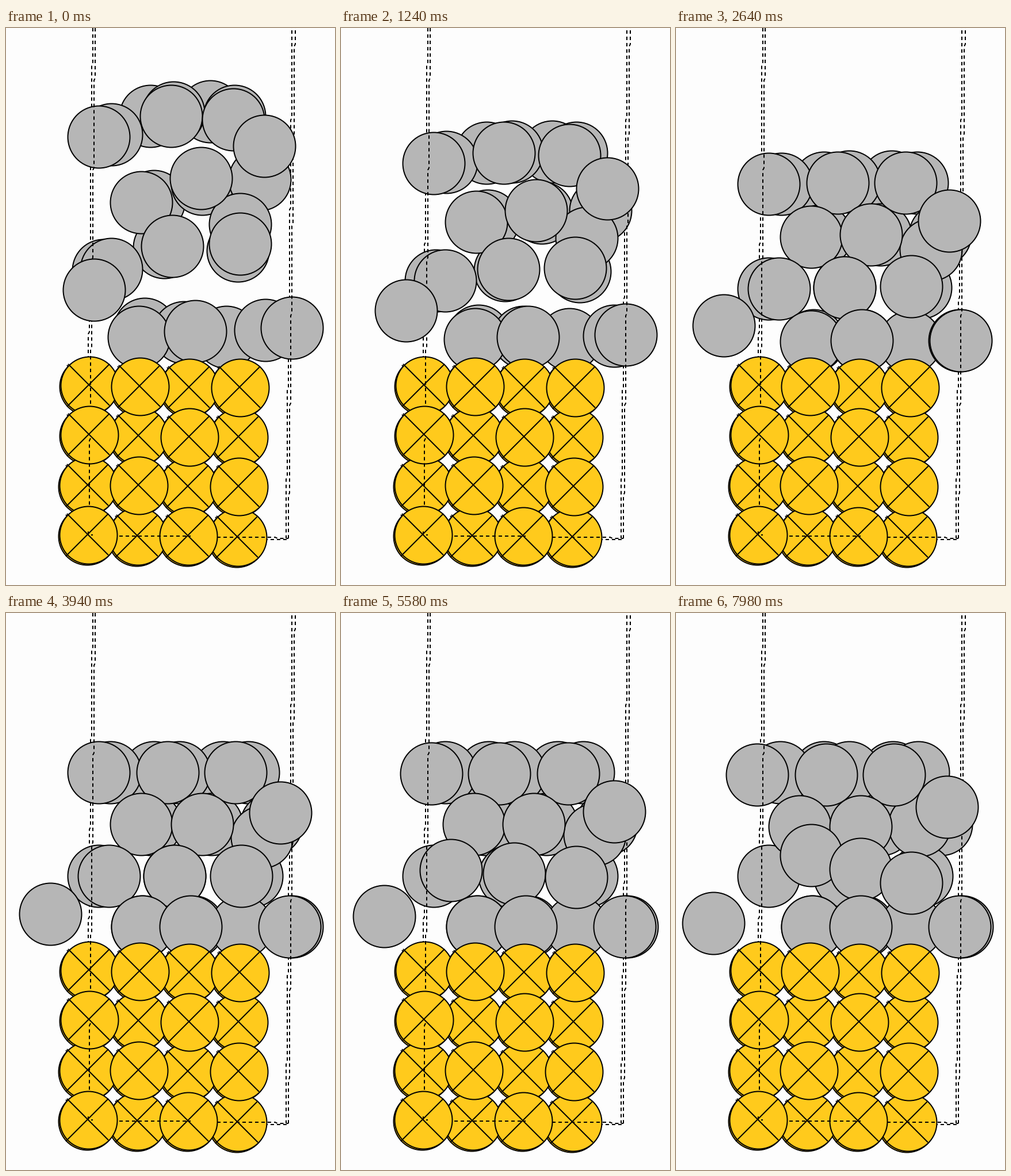
Animation, 572 px wide and 968 px high, one loop 8000 ms. Source, as a matplotlib script:

```python
import numpy as np
import matplotlib.pyplot as plt
from matplotlib.animation import FuncAnimation
from matplotlib.collections import EllipseCollection

W, H, DPI = 572, 968, 100
TICK, LOOP = 20, 8000
PX = 72 / DPI
PAPER, GREY, GOLD = "#fdfdfd", "#b6b6b6", "#ffca1c"
ROWS = [(161, 119), (235, 105), (179, 115), (236, 86)]  # first x, spacing

rng = np.random.default_rng(4)
fig = plt.figure(figsize=(W / DPI, H / DPI), dpi=DPI, facecolor=PAPER)
ax = fig.add_axes([0, 0, 1, 1])
ax.set_xlim(0, W)
ax.set_ylim(H, 0)
ax.axis("off")


def balls(centres, size, color, z):
    group = EllipseCollection([size], [size], [0], units="xy",
                              offsets=centres, offset_transform=ax.transData,
                              facecolors=color, edgecolors="black",
                              linewidths=2 * PX, zorder=z)
    return ax.add_collection(group, autolim=False)


def line(points, z, dashed=True):
    xs, ys = zip(*points)
    art, = ax.plot(xs, ys, color="black", lw=2 * PX, zorder=z,
                   dash_capstyle="butt", solid_capstyle="butt")
    if dashed:
        art.set_linestyle((0, (3, 2.5)))


def upright(x, top, bend, bottom, z):
    """A nearly vertical edge that shifts 2 px left every 156 px."""
    points = [(x, top)]
    while bend < bottom:
        points += [(x, bend - 2), (x - 2, bend + 2)]
        x -= 2
        bend += 156
    line(points + [(x, bottom)], z)


def gold_centre(row, col):
    return (145 + 2 * round(43.6 * col - 0.45 * row),
            621 + 2 * round(43.4 * row + (0.76 - 0.1 * row) * col))


def gold_layer(cells, z, shift=0):
    centres = [(x - shift, y + shift) for x, y in
               (gold_centre(r, c) for r, c in cells)]
    balls(centres, 100, GOLD, z)
    for x, y in centres:
        for s in (-1, 1):
            line([(x - 37, y - 1 - 36 * s), (x + 35, y - 1 + 36 * s)],
                 z + 0.1, dashed=False)


# Far edges of the box
upright(151, 0, 62, 883, 1)
upright(497, 4, 158, 887, 1)
line([(141, 883), (453, 889), (487, 889), (491, 887)], 1)

# Fixed stack, alternating in depth
cells = [(r, c) for r in range(4) for c in range(4)]
gold_layer(cells, 3, shift=2)
gold_layer([(r, c) for r, c in cells if (r + c) % 2 == 0], 4)
gold_layer([(r, c) for r, c in cells if (r + c) % 2], 5)

# Near edges, broken where a gold ball covers them
upright(155, 0, 89, 656, 6)
line([(147, 713), (145, 717), (145, 830)], 6)
line([(143, 875), (143, 881), (151, 881)], 6)
upright(503, 4, 30, 887, 6)
line([(197, 883), (321, 883)], 6)
line([(367, 885), (468, 885), (472, 887), (491, 887)], 6)


def ball(row, col, shift=0, near=False):
    """Start, resting and final centre of one loose ball."""
    x0, gap = ROWS[row]
    home = np.array([x0 + gap * col + shift, 278 + 89 * row])
    level = 3 - row
    lift = 16 + 25 * level + (35 if col and level else 0)
    lean = 0 if near else -14 * col
    start = home + [lean, -lift] + rng.uniform(-8, 8, 2)
    drift = [0, 0]
    if near and row < 2:
        drift = [-20, 4]
    elif near and row == 2:
        drift = [28 * (2 - col), 24 * col - 36]
    return start, home, home + drift


far = [ball(0, c, -23) for c in (1, 2)]
far += [ball(0, c, 21) for c in range(3)]
far += [ball(1, c, 16) for c in range(3)]
far += [ball(2, c, 18 * (c - 1)) for c in range(3)]
far += [ball(3, c, 2) for c in range(4)]
near = [ball(r, c, near=True) for r, c in
        [(r, c) for r in range(4) for c in range(4 if r == 3 else 3)]
        if (r, c) not in ((1, 2), (3, 2))]
stray = [((407, 341), (445, 389), (423, 369))]
# These two pass in front of the wire box.
nearest = [((153, 455), (77, 523), (65, 539)),
           ((449, 205), (477, 347), (471, 337))]

movers = []
for group, z in ((far + stray + near, 2), (nearest, 7)):
    start, home, end = np.array(group, float).transpose(1, 0, 2)
    movers.append((start, home, end, balls(start, 108, GREY, z)))


def step_at(ms):
    """Steps come in threes, held for 100, 20 and 20 ms."""
    if ms < 20:
        return 0
    group, phase = divmod(ms - 20, 140)
    return 1 + 3 * group + (phase >= 100) + (phase >= 120)


def draw(i):
    step = step_at(i * TICK)
    fall = np.sin(np.pi / 2 * min(step / 75, 1))
    creep = max(0, (step - 85) / 86) ** 1.6
    for start, home, end, art in movers:
        xy = start + fall * (home - start) + creep * (end - home)
        art.set_offsets(2 * np.round((xy - 1) / 2) + 1)
    return [m[-1] for m in movers]


anim = FuncAnimation(fig, draw, frames=LOOP // TICK, interval=TICK,
                     repeat=True, repeat_delay=0, blit=False)
plt.show()
```
